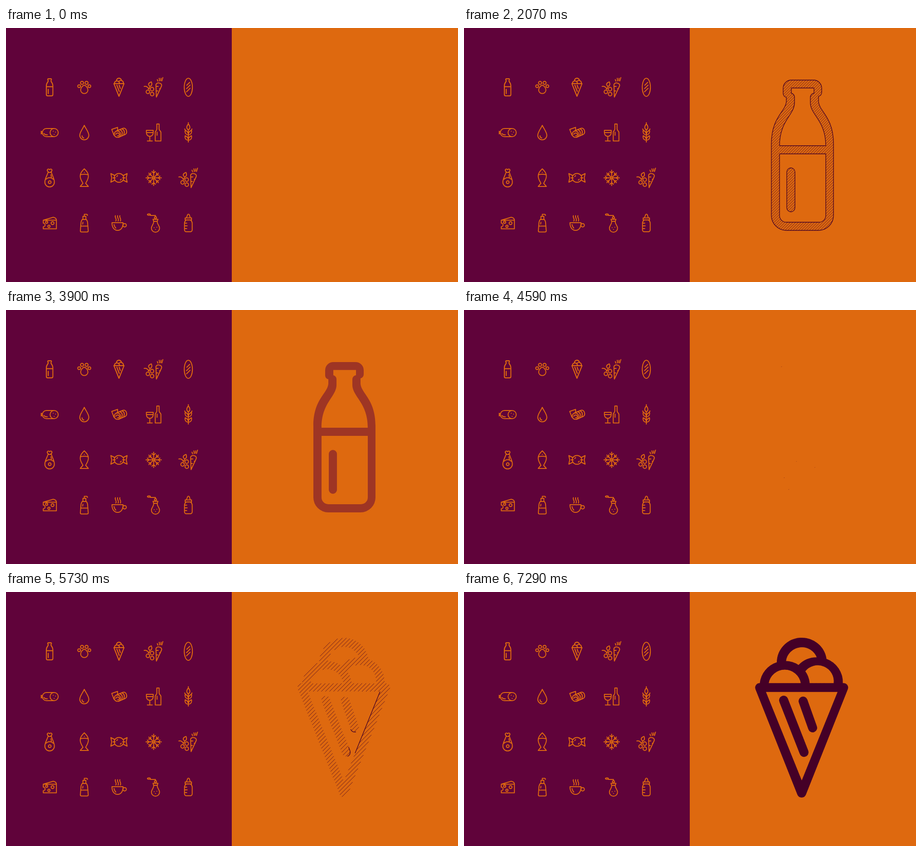
Write an HTML page with a canvas that moves like this. It is 997x561 px and loops after 8000 ms.

```html
<!DOCTYPE html>
<html lang="en">
<head>
<meta charset="utf-8">
<title>Icon drawing</title>
<style>
  html, body { margin: 0; width: 100%; height: 100%; overflow: hidden; background: #de690f; }
  canvas { display: block; }
</style>
</head>
<body>
<canvas id="stage" width="997" height="561"></canvas>
<script>
const ctx = document.getElementById('stage').getContext('2d');
const PURPLE = '#60033a', ORANGE = '#de690f', DARK = '#450027';

const clamp = v => Math.max(0, Math.min(1, v));
const smooth = v => (1 - Math.cos(Math.PI * clamp(v))) / 2;

// Large icons: contours as [path, delay of its outline in ms]
const bottle = {
  start: 150, leave: 3810, color: PURPLE, gap: 5.95, phase: 792, cx: 746.7, cy: 281,
  box: [676, 113, 818, 449],
  contours: [
    ['M704 145V133A18 18 0 0 1 722 115H771A18 18 0 0 1 789 133V142A9 9 0 0 1 782 151V163C784 185 815 197 815 256V414A33 33 0 0 1 782 447H711A33 33 0 0 1 678 414V256C678 197 709 185 711 163V153A9 9 0 0 1 704 145Z', 1120],
    ['M696 260H798C798 204 764 192 764 165V153A9 9 0 0 1 772 144V132.5H722V144A9 9 0 0 1 729 153V165C729 192 696 204 696 260Z', 1080],
    ['M696 278H798V414A15 15 0 0 1 783 429H711A15 15 0 0 1 696 414Z', 910],
    ['M721 406A9 9 0 0 0 730 397V318A9 9 0 0 0 712 318V397A9 9 0 0 0 721 406Z', 960]
  ]
};
const cone = {
  start: 4590, leave: 1e5, color: DARK, gap: 8.97, phase: 852.5, cx: 745, cy: 279,
  box: [640, 103, 849, 455],
  contours: [
    ['M653 202A54.5 54.5 0 0 1 690.6 155.7A54.5 54.5 0 0 1 799 148A55 55 0 0 1 835 202H838A9.2 9.2 0 0 1 846 214.5L753.5 447.5A9.5 9.5 0 0 1 736 447.5L643.5 214.5A9.2 9.2 0 0 1 652 202Z', 1150],
    ['M709.5 153A36 36 0 0 1 779 145A55 55 0 0 0 738 162A54.5 54.5 0 0 0 709.5 153Z', 1150],
    ['M671.4 202A36.5 36.5 0 0 1 743.6 202Z', 1150],
    ['M752 175A36 36 0 0 1 816 202H762A54.5 54.5 0 0 0 752 175Z', 1150],
    ['M825 220L745 418L665 220Z', 910],
    ['M753 363A9.3 9.3 0 0 0 758.7 350.6L713.7 235.6A9.3 9.3 0 0 0 696.3 242.4L741.3 357.4A9.3 9.3 0 0 0 753 363Z', 1025],
    ['M760.2 303.1A9.3 9.3 0 0 0 777.8 296.9L756.8 237.9A9.3 9.3 0 0 0 739.2 244.1Z', 1025]
  ]
};

function prepare(icon) {
  icon.shape = new Path2D(icon.contours.map(c => c[0]).join(''));
  icon.lines = icon.contours.map(([d, delay]) => {
    const el = document.createElementNS('http://www.w3.org/2000/svg', 'path');
    el.setAttribute('d', d);
    return { path: new Path2D(d), length: el.getTotalLength(), delay };
  });
  // Diagonal hatch, cut to the parts inside the shape
  let seed = 7;
  const random = () => (seed = seed * 16807 % 2147483647) / 2147483647;
  const [x0, y0, x1, y1] = icon.box;
  icon.hatch = [];
  const first = icon.phase + Math.ceil((x0 + y0 - icon.phase) / icon.gap) * icon.gap;
  for (let c = first; c < x1 + y1; c += icon.gap) {
    let from = null;
    for (let x = x0; x <= x1; x += 0.5) {
      const inside = ctx.isPointInPath(icon.shape, x, c - x, 'evenodd');
      if (inside && from === null) from = x;
      if (!inside && from !== null) {
        icon.hatch.push({ x: from, y: c - from, size: x - from, delay: random() * 600 });
        from = null;
      }
    }
  }
}

function drawLarge(icon, now) {
  if (now < icon.start || now >= icon.leave + 180) return;
  const t = now - icon.start + 20;
  const fill = smooth((t - 1900) / 800);
  const shown = 1 - clamp((now - icon.leave) / 180);
  ctx.strokeStyle = DARK;
  ctx.globalAlpha = shown * (icon.color === DARK ? 1 : 1 - fill);
  ctx.lineCap = 'butt';
  ctx.lineWidth = 0.8;
  ctx.beginPath();
  for (const h of icon.hatch) {
    const d = h.size * clamp((t - h.delay) / 350);
    if (d > 0) {
      ctx.moveTo(h.x, h.y);
      ctx.lineTo(h.x + d, h.y - d);
    }
  }
  ctx.stroke();
  ctx.lineWidth = 1.3;
  for (const l of icon.lines) {
    const d = l.length * smooth((t - l.delay) / 750);
    if (d <= 0) continue;
    ctx.setLineDash([d, l.length + 5]);
    ctx.stroke(l.path);
  }
  ctx.setLineDash([]);
  ctx.globalAlpha = shown * fill;
  ctx.fillStyle = icon.color;
  ctx.fill(icon.shape, 'evenodd');
  ctx.globalAlpha = 1;
}

// Small icons, centred on 0,0
const ring = (x, y, r, ry = r) => `M${x - r} ${y}a${r} ${ry} 0 1 0 ${2 * r} 0a${r} ${ry} 0 1 0 ${-2 * r} 0Z`;
const dot = (x, y) => `M${x} ${y}h.1`;
const leaves = y => [-1, 1].map(s =>
  `M0 ${y}C${-7 * s} ${y - 1} ${-8 * s} ${y - 6} ${-7 * s} ${y - 10}C${-2 * s} ${y - 8} 0 ${y - 5} 0 ${y}`).join('');
const flake = Array.from({ length: 8 }, (_, i) => {
  const size = i % 2 ? 0.88 : 1;
  const at = (r, turn) => {
    const a = i * Math.PI / 4 + turn;
    return `${(size * r * Math.cos(a)).toFixed(2)} ${(size * r * Math.sin(a)).toFixed(2)}`;
  };
  return `M${at(2, 0)}L${at(17, 0)}M${at(14.5, -0.27)}L${at(10.5, 0)}L${at(14.5, 0.27)}`;
}).join('');

const veg = ring(-12.7, 10, 3.9) + ring(-3.6, 4, 3.9) + ring(-3.4, 15, 3.9) +
  'M-21 -2C-16 -3 -12 0 -11 4M-8 -2C-14 -6 -11 -10 -5 -12C-3 -7 -4 -3 -8 -2ZM-8 -2L-10 3' +
  'M6 21.5L5 -5C5 -9 9 -10 12 -9.5C16 -9 19 -6 17 -2ZM6 -2h4M13 3h2M6 8h3' +
  'M8 -17L9.5 -13.5M12.3 -20L13.3 -14M16.3 -20L15.8 -15M20.3 -21.5L18 -14';

const small = [
  bottle,
  ring(-11.4, -2.5, 3.1) + ring(-5, -9.8, 3.4) + ring(5, -9.8, 3.4) + ring(11.2, -2.5, 3.1) +
    'M0 -4.5C3 -4.5 8 1 8 6A8 7.8 0 0 1 -8 6C-8 1 -3 -4.5 0 -4.5Z',
  cone,
  veg,
  ring(0, 0, 9, 20) + 'M-3.5 -4.5L3 -11M-4 3L4 -5M-4 10L4 2',
  'M10 -9H-7A9 9 0 0 0 -7 9H10' + ring(10, 0, 9) + 'M-16 1L-18.5 3V-3L-16 -1M-12.5 2Q-11 5 -5 5' +
    dot(8, -3) + dot(13, -1) + dot(10, 4),
  'M0 -16C3 -9 10 -1 10 6A10 10 0 0 1 -10 6C-10 -1 -3 -9 0 -16ZM-5 7Q-5 11 -1 12',
  'M-3 -6V-11.5L-16 -7L-11 6M-5 -4L9 -9.5C16 -11 20 0 14 4L-1 10.5' + ring(-3.5, 3.5, 7) +
    'M-7 4a4 3 0 1 1 4 3M2 -6.5q8 4 4 13M6.5 -8.5q8 4 4 13',
  'M-16 -5H-1V0C-1 11 -16 11 -16 0ZM-16 0H-1M-8.5 9V18M-14 18.5H-3' +
    'M7 -19H12V-8C12 -4 16 -4 16 0V18.5H3.5V0C3.5 -4 7 -4 7 -8ZM7.5 -1V6',
  'M0 -22V-18M0 -19C-5 -13 -4 -8 0 -6C4 -8 5 -13 0 -19ZM0 -6V21' + leaves(5) + leaves(17) +
    'M-8 -8L-6 -4M8 -8L6 -4',
  'M-2.5 -12.5L-5 -15.5C-6 -19 -2.5 -21 0 -18C2.5 -21 6 -19 5 -15.5L2.5 -12.5' +
    'M-3.5 -12H4C6 -4 10.5 2 10.5 9.5A10.5 10.5 0 0 1 -10.5 9.5C-10.5 2 -6 -4 -3.5 -12ZM3 -7L4 -1M-8 3Q0 -4 8 3' +
    ring(0.3, 9.5, 3),
  'M0 -20C-6 -14 -9 -10 -9 -4C-9 3 -5 8 -3 12L-9 19H9L3 12C5 8 9 3 9 -4C9 -10 6 -14 0 -20ZM-8 -7Q0 -9 8 -7' +
    dot(0, -12),
  ring(0, 0, 10.5, 9.8) + 'M-9 -5L-18 -9.5L-16 0L-18 9.5L-9 5M9 -5L18 -9.5L16 0L18 9.5L9 5M-13 0h5M8 0h5M-5 -3l2 -2M5 3l-2 2',
  ring(0, 0, 2) + flake,
  veg,
  'M-14 -6.5L8 -13C13 -12 15 -9 15 -6.5V12.5H-14V8a4 4 0 0 0 0 -8V-6.5H15' +
    ring(-6.5, -2, 2.4) + ring(6.5, 0, 3.2) + ring(-1.5, 7, 2.4),
  'M-4.5 -8H4.5C7 -5 7.5 -2 7.5 2L8.7 17Q8.7 19.5 6 19.5H-6Q-8.7 19.5 -8.7 17L-7.5 2C-7.5 -2 -7 -5 -4.5 -8Z' +
    'M-8 6.5H8M-3 -8V-15H3.5V-8M0 -15V-19.5H5Q7 -19.5 7 -17M-3 -2L-3.5 2',
  'M-15.5 -1H9C9 10 4 16 -3 16S-15.5 10 -15.5 -1ZM-11 3Q-10 8 -7 11' + ring(12.5, 4.7, 3.8) +
    [-8, -3, 2].map(x => `M${x} -16.5c-2 4 4 7 1 12`).join(''),
  'M4 -14V-17H-7' + ring(-10.5, -19, 3.3, 1.6) + ring(4, -12, 2.3) + 'M-1.5 -8.5H9.5L8 -4H0Z' +
    'M0 -4C1 2 -5 5 -5 11A9 9 0 0 0 13 11C13 5 7 2 8 -4' + dot(1, 10) + dot(7, 9) + dot(4, 14),
  'M-4 -12C-4 -15 -2 -15 -2 -18A2.3 2.3 0 0 1 2.5 -18C2.5 -15 4 -15 4 -12M-7 -11.5H7V-7H-7Z' +
    'M-5 -7C-8 -4 -8.5 -3 -8.5 0V15A4 4 0 0 0 -4 19H4A4 4 0 0 0 8.5 15V0C8.5 -3 8 -4 5 -7M-7.5 0h4M-7.5 6h5M-7.5 12h4'
].map(s => typeof s === 'string' ? new Path2D(s) : s);

function drawSmall(icon, i) {
  ctx.save();
  ctx.translate(96.2 + i % 5 * 76.5, 131 + Math.floor(i / 5) * 100);
  if (icon.shape) {
    ctx.scale(0.12, 0.12);
    ctx.translate(-icon.cx, -icon.cy);
    ctx.fill(icon.shape, 'evenodd');
  } else {
    ctx.stroke(icon);
  }
  ctx.restore();
}

function draw(now) {
  const t = Math.floor(now % 8000 / 30) * 30;
  ctx.fillStyle = ORANGE;
  ctx.fillRect(0, 0, 997, 561);
  ctx.fillStyle = PURPLE;
  ctx.fillRect(0, 0, 498, 561);
  ctx.fillStyle = ctx.strokeStyle = ORANGE;
  ctx.lineWidth = 2;
  ctx.lineCap = ctx.lineJoin = 'round';
  small.forEach(drawSmall);
  drawLarge(bottle, t);
  drawLarge(cone, t);
}

prepare(bottle);
prepare(cone);
const begin = performance.now();
function frame() {
  draw(performance.now() - begin);
  requestAnimationFrame(frame);
}
frame();
</script>
</body>
</html>
```
